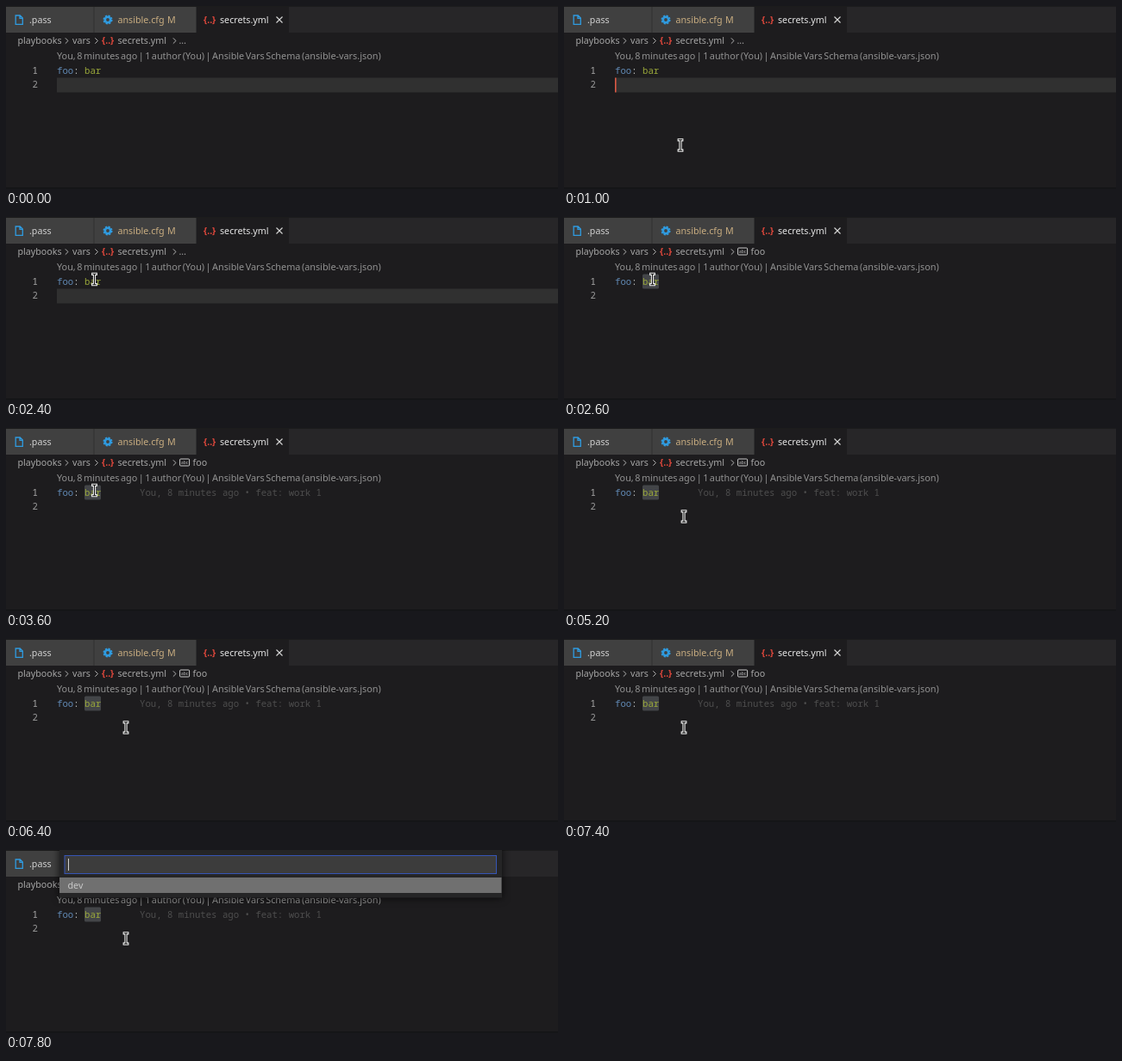
An HTML page that plays this animation: 640 px wide and 213 px high, repeating every 8 s.

```html
<!DOCTYPE html>
<html lang="en">
<head>
<meta charset="utf-8">
<style>
  html, body { margin: 0; height: 100%; overflow: hidden; background: #1d1c1e; }
  svg { display: block; width: 640px; height: 213px; }
  text { font: 10.7px "Noto Sans", sans-serif; fill: #a6a6a6; white-space: pre; }
  .mono { font: 10.667px "Noto Sans Mono", monospace; fill: #c5c8c6; }
  .lens { font-size: 10.85px; word-spacing: -1.35px; fill: #929292; }
  .braces { font-size: 10.5px; font-weight: 600; fill: #e0483c; }
  .line { fill: none; stroke: #b4b4b4; }
</style>
</head>
<body>
<svg viewBox="0 0 640 213">
  <defs>
    <path id="chevron" class="line" d="M-1.7-3.2 1.5 0-1.7 3.2"/>
    <text id="braces" class="braces">{..}</text>
    <path id="beam" d="M-1.8-6.2H1.8M0-6.2V6.2M-1.8 6.2H1.8"/>
  </defs>

  <rect width="640" height="213" fill="#1d1c1e"/>
  <rect y="211" width="640" height="2" fill="#151517"/>

  <!-- tabs -->
  <rect width="640" height="31" fill="#272628"/>
  <rect width="221" height="31" fill="#404040"/>
  <path d="M102 0V31M220.5 0V31" stroke="#303030"/>
  <rect x="221" width="107" height="31" fill="#1d1c1e"/>
  <rect width="640" height="1" fill="#1c1c1c"/>
  <path d="M11.2 11H16.3L19.3 14V21.4H11.2ZM16 11V14.4H19.3" fill="none" stroke="#2f9be0" stroke-width="1.3"/>
  <text x="27" y="20" style="fill:#d0d0d0">.pass</text>
  <g fill="none" stroke="#2f9be0">
    <circle cx="118" cy="16" r="3.2" stroke-width="2.6"/>
    <circle cx="118" cy="16" r="4.8" stroke-width="1.5" stroke-dasharray="2.2 1.57"/>
  </g>
  <text x="129.5" y="20" style="fill:#c9ad80">ansible.cfg</text>
  <text x="187" y="20" style="fill:#c9ad80">M</text>
  <use href="#braces" x="229" y="19.5"/>
  <text x="248" y="20" style="fill:#e6e6e6">secrets.yml</text>
  <path d="M313.5 12.5l7 7m0-7l-7 7" stroke="#d8d8d8" stroke-width="1.1"/>

  <!-- breadcrumbs -->
  <text x="13.5" y="44">playbooks</text>
  <use href="#chevron" x="70.5" y="40.5"/>
  <text x="77" y="44">vars</text>
  <use href="#chevron" x="105" y="40.5"/>
  <use href="#braces" x="111" y="43.5"/>
  <text x="129.5" y="44">secrets.yml</text>
  <use href="#chevron" x="195.5" y="40.5"/>
  <text id="ellipsis" x="200.5" y="44">…</text>
  <g id="symbol">
    <rect class="line" x="201.6" y="36" width="11" height="8" rx="1" style="stroke:#c8c8c8"/>
    <text x="203" y="41.8" style="font-size:4.8px;fill:#c8c8c8">abc</text>
    <text x="216.5" y="44">foo</text>
  </g>

  <!-- editor -->
  <rect id="currentLine" x="59" y="83.5" width="581" height="17" fill="#303030"/>
  <rect id="selection" x="91" y="66.5" width="19" height="17" rx="1.5" fill="#434548"/>
  <text class="lens" x="59" y="62">You, 8 minutes ago | 1 author (You) | Ansible Vars Schema (ansible-vars.json)</text>
  <text class="mono" x="30.4" y="78.6" style="fill:#aaa">1</text>
  <text class="mono" x="30.4" y="95.2" style="fill:#999">2</text>
  <text class="mono" x="59" y="78.6"><tspan fill="#6089b4">foo</tspan>: <tspan fill="#9aa83a">bar</tspan></text>
  <text id="blame" class="mono" x="155" y="78.6" style="fill:#4e4e4e">You, 8 minutes ago • feat: work 1</text>
  <rect id="caret" width="1.6" height="17" fill="#dc5844"/>

  <!-- quick pick -->
  <g id="picker">
    <rect x="62" y="-4" width="513" height="59.5" fill="#252526" style="filter:drop-shadow(0 0 5px #000b)"/>
    <rect x="68" y="6.5" width="500.5" height="21" fill="#3c3c3c" stroke="#3655b5"/>
    <rect x="72" y="10" width="1" height="14" fill="#d0d0d0"/>
    <rect x="62" y="32" width="512.5" height="18" fill="#707070"/>
    <text x="71.5" y="45" style="fill:#c9c9c9">dev</text>
  </g>

  <g id="pointer" fill="none" stroke-linecap="square">
    <use href="#beam" stroke="#f2f2f2" stroke-width="3.2"/>
    <use href="#beam" stroke="#111" stroke-width="1.1"/>
  </g>
</svg>
<script>
const LOOP = 8000, STEP = 200;
const SELECT_AT = 2600, BLAME_AT = 2800, PICKER_AT = 7600;
// time, x, y
const path = [
  [800, 135, 162], [1200, 135, 162], [1600, 103, 75], [2000, 102.5, 72.5],
  [3800, 102.5, 72.5], [4800, 139, 103], [LOOP, 139, 103]
];

const el = id => document.getElementById(id);
const show = (id, on) => { el(id).style.visibility = on ? "visible" : "hidden"; };
const ease = u => u * u * (3 - 2 * u);

function pointerAt(t) {
  const i = Math.max(1, path.findIndex(p => p[0] > t));
  const [t0, x0, y0] = path[i - 1], [t1, x1, y1] = path[i];
  const u = ease(Math.max(0, (t - t0) / (t1 - t0)));
  return [x0 + (x1 - x0) * u, y0 + (y1 - y0) * u];
}

function caretOn(t) {
  if (t < SELECT_AT) return (t >= 600 && t < 1200) || (t >= 1600 && t < 2000);
  return t < PICKER_AT && (t + 200) % 1000 < 400;
}

function draw(now) {
  const t = Math.floor(now % LOOP / STEP) * STEP;
  const selected = t >= SELECT_AT;
  show("currentLine", !selected);
  show("ellipsis", !selected);
  show("selection", selected);
  show("symbol", selected);
  show("blame", t >= BLAME_AT);
  show("picker", t >= PICKER_AT);
  show("caret", caretOn(t));
  el("caret").setAttribute("x", selected ? 109.2 : 59);
  el("caret").setAttribute("y", selected ? 66.5 : 83.5);
  show("pointer", t >= path[0][0]);
  el("pointer").setAttribute("transform", `translate(${pointerAt(t)})`);
  requestAnimationFrame(draw);
}
draw(performance.now());
</script>
</body>
</html>
```
